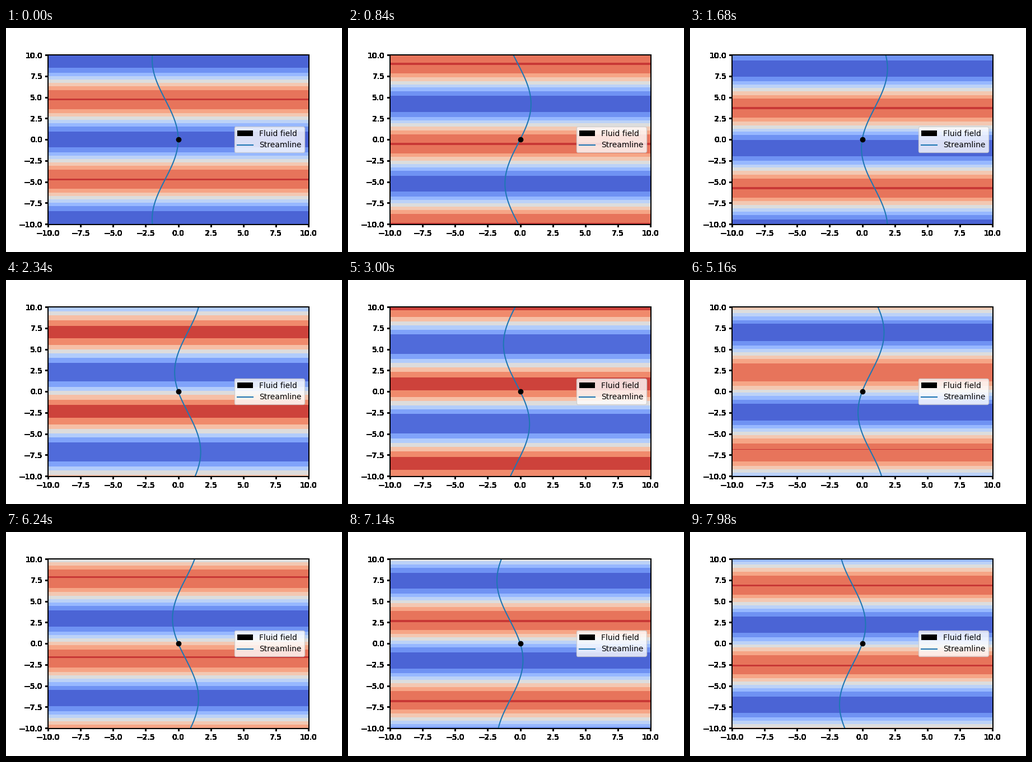
These frames come from a looping animation (600x400 px, 8000 ms). A matplotlib script:

```python
import numpy as np
import matplotlib.pyplot as plt
from matplotlib.animation import FuncAnimation
from matplotlib.lines import Line2D
from matplotlib.patches import Patch

TICK = 20       # ms per animation frame
HOLD = 3        # frames per simulation step
FRAMES = 400
DT = 0.1

plt.rcParams["font.family"] = "DejaVu Sans"
fig, ax = plt.subplots(figsize=(6, 4), dpi=100)
fig.subplots_adjust(left=0.125, right=0.9, bottom=0.125, top=0.88)
ax.set(xlim=(-10, 10), ylim=(-10, 10))
ticks = np.arange(-10, 10.1, 2.5)
ax.set_xticks(ticks)
ax.set_yticks(ticks)

# Hard-edged axis labels: every touched pixel turns fully black
fig.canvas.draw()
gray = np.asarray(fig.canvas.buffer_rgba())[..., 0]
ink = np.where(gray < 255, 0, 255).astype(np.uint8)
fig.figimage(np.dstack([ink] * 3), zorder=-1)
ax.xaxis.set_visible(False)
ax.yaxis.set_visible(False)

grid = np.linspace(-10, 10, 20)
X, Y = np.meshgrid(grid, grid)
path_y = np.linspace(-10, 10, 200)

stream, = ax.plot([], [], color="tab:blue", lw=1.5)
ax.plot([0], [0], "ko", ms=6)
ax.legend(
    [Patch(color="black", lw=0), Line2D([], [], color="tab:blue", lw=1.5)],
    ["Fluid field", "Streamline"],
    loc="center right",
)

state = {"step": None, "bands": None}


def show(step):
    """Draw the speed bands and the streamline through the origin."""
    if step == state["step"]:
        return
    if state["bands"] is not None:
        state["bands"].remove()
    t = step * DT
    speed = np.hypot(3, np.sin(Y / 3 - t))
    state["bands"] = ax.contourf(X, Y, speed, cmap="coolwarm")
    state["step"] = step
    stream.set_data(np.cos(path_y / 3 - t) - np.cos(t), path_y)


def init():
    show(0)
    return []


def update(frame):
    show(frame // HOLD)
    return []


anim = FuncAnimation(fig, update, frames=FRAMES, init_func=init,
                     interval=TICK, repeat=True, repeat_delay=0, blit=False)
plt.show()
```
